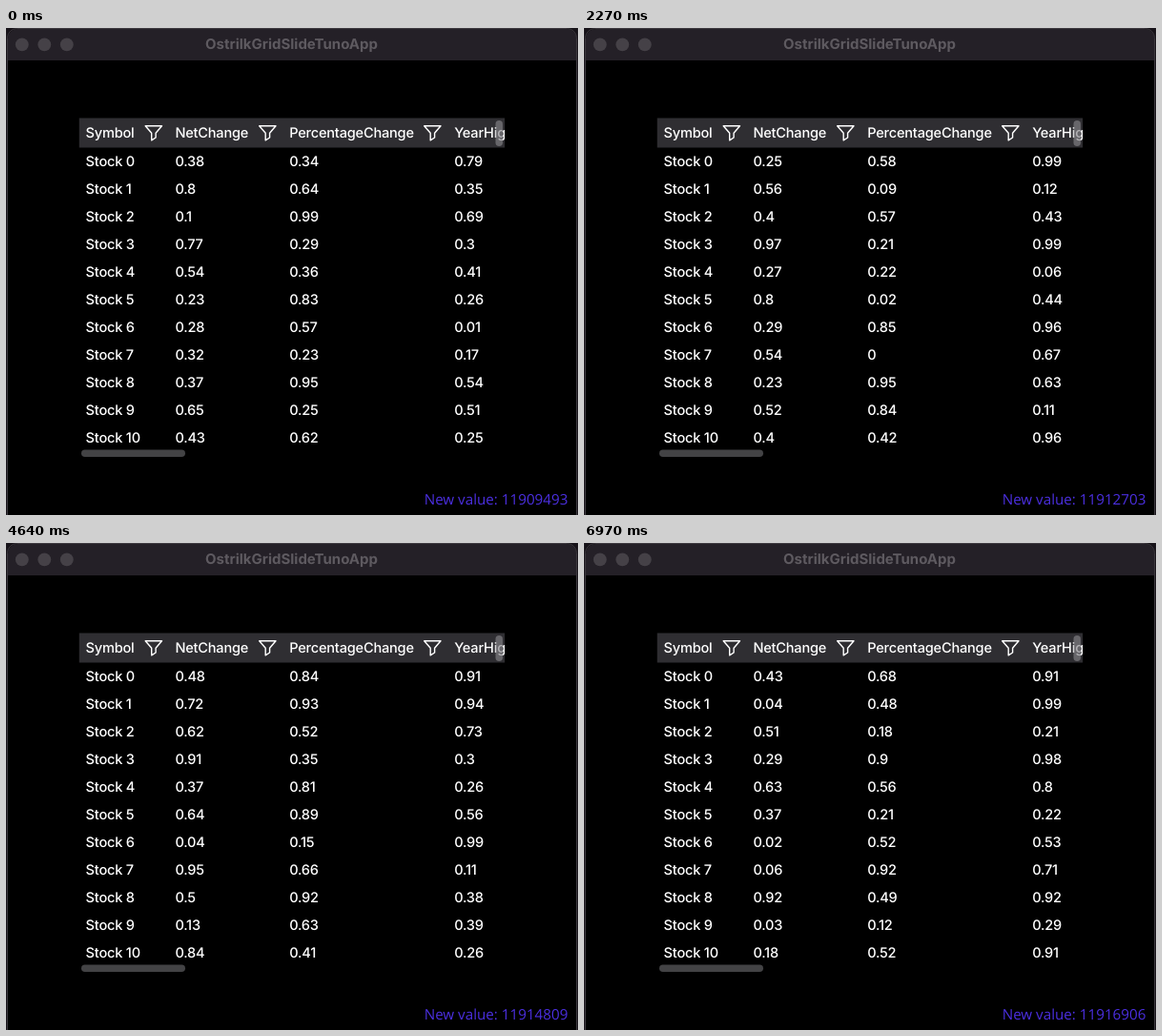
An HTML page that plays this animation: 600 by 511 pixels, repeating every 7000 ms.

```html
<!DOCTYPE html>
<html lang="en">
<head>
<meta charset="utf-8">
<title>Live grid</title>
<style>
  html, body { margin: 0; width: 100%; height: 100%; overflow: hidden; background: #161218; }
  svg { display: block; width: 600px; height: 511px; text-rendering: geometricPrecision; }
  text { font: 500 14.6px Inter, sans-serif; letter-spacing: -.22px; fill: #fff; }
  .title { font-weight: 700; font-size: 15px; letter-spacing: 0; fill: #5e5a60; text-anchor: middle; }
  .counter { font: 15.2px "Open Sans", sans-serif; letter-spacing: 0; fill: #4b2fe0; }
  .funnel { fill: none; stroke: #fff; stroke-width: 1.4; stroke-linejoin: round; }
</style>
</head>
<body>
<svg viewBox="0 0 600 511">
  <defs>
    <clipPath id="window"><rect x="2" y="1" width="596.5" height="522" rx="10"/></clipPath>
    <clipPath id="grid"><rect x="76.5" y="94" width="446.8" height="357"/></clipPath>
    <path id="funnel" class="funnel" d="M.7 102.7H18L11.6 110.3V115L7.2 117.8V110.3Z"/>
  </defs>
  <g clip-path="url(#window)">
    <rect width="600" height="511"/>
    <rect width="600" height="34" fill="#242027"/>
  </g>
  <rect x="1.5" y=".5" width="597" height="523" rx="10" fill="none" stroke="#3c383e"/>
  <g fill="#454147">
    <circle cx="16.8" cy="17.4" r="6.9"/>
    <circle cx="40.3" cy="17.4" r="6.9"/>
    <circle cx="63.8" cy="17.4" r="6.9"/>
  </g>
  <text class="title" x="299.5" y="22.3">OstrilkGridSlideTunoApp</text>
  <g id="table" clip-path="url(#grid)">
    <rect x="76.5" y="94.5" width="447" height="31" fill="#2f2e32"/>
    <use href="#funnel" x="145.5"/>
    <use href="#funnel" x="265"/>
    <use href="#funnel" x="438"/>
  </g>
  <rect x="513.5" y="97" width="7.5" height="27" rx="3.75" fill="#858488" fill-opacity=".65"/>
  <rect x="79" y="442.5" width="109" height="7.5" rx="3.75" fill="#434345"/>
  <text class="counter" id="counter" x="438.7" y="500"></text>
</svg>
<script>
const LOOP = 7000, FIRST_UPDATE = 120, UPDATE_EVERY = 264, ROWS = 11, ROW_HEIGHT = 29;
const headers = ["Symbol", "NetChange", "PercentageChange", "YearHigh"];
const columnX = [83.6, 177.4, 297.2, 470.2];
const counts = [11909493, 11910565, 11911634, 11912703, 11913756, 11914809, 11915862, 11916906];

const table = document.getElementById("table");
const counter = document.getElementById("counter");

function addText(column, y, content = "") {
  const node = document.createElementNS("http://www.w3.org/2000/svg", "text");
  node.setAttribute("x", columnX[column]);
  node.setAttribute("y", y);
  node.textContent = content;
  return table.appendChild(node);
}

// Seeded random value from 0 to 0.99 for one cell at one step.
function cellValue(step, cell) {
  const n = Math.sin(step * 78.233 + cell * 12.9898 + 4.1) * 43758.5453;
  return Math.floor((n - Math.floor(n)) * 100) / 100;
}

headers.forEach((name, column) => addText(column, 115.4, name));
const cells = [];
for (let row = 0; row < ROWS; row++) {
  const y = 145.4 + row * ROW_HEIGHT;
  addText(0, y, `Stock ${row}`);
  for (let column = 1; column < headers.length; column++) cells.push(addText(column, y));
}

let shownStep = -1;
function draw() {
  const time = performance.now() % LOOP;
  const step = Math.floor((time - FIRST_UPDATE) / UPDATE_EVERY) + 1;
  if (step !== shownStep) {
    cells.forEach((cell, i) => { cell.textContent = cellValue(step, i); });
    // The counter moves with every fourth refresh of the cells.
    counter.textContent = `New value: ${counts[Math.ceil(step / 4)]}`;
    shownStep = step;
  }
  requestAnimationFrame(draw);
}
draw();
</script>
</body>
</html>
```
